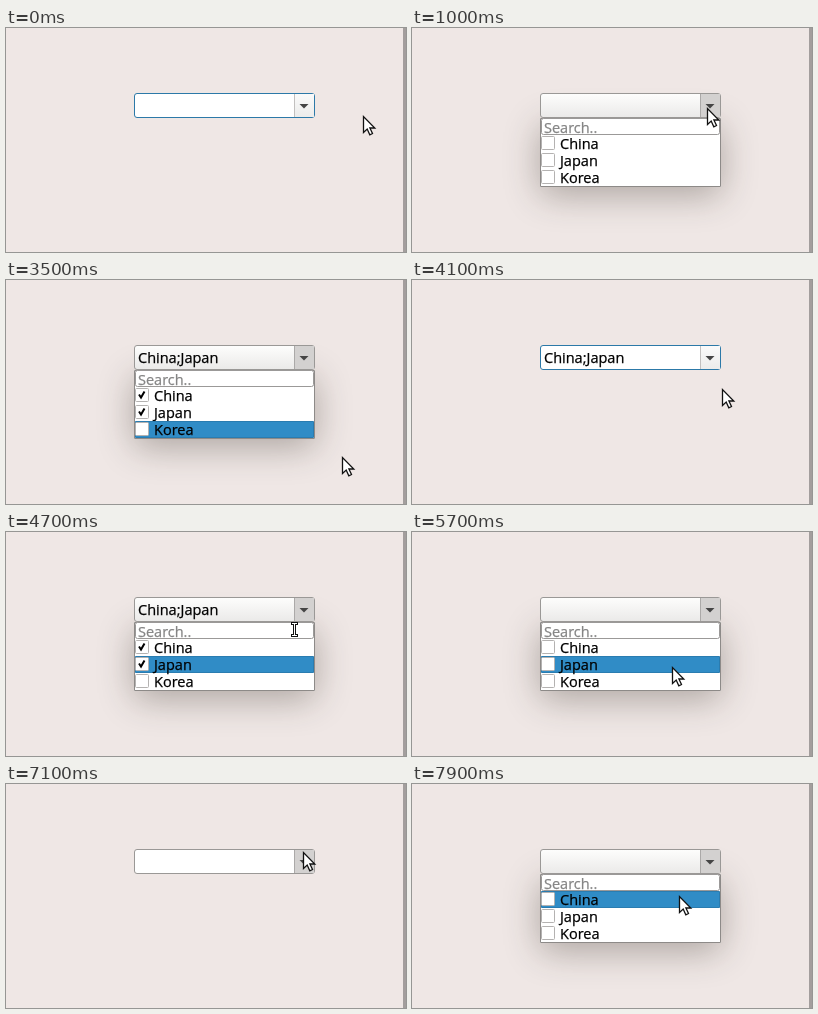
Write an HTML page with a canvas that moves like this. It is 400 by 224 pixels and loops after 8 s.

```html
<!DOCTYPE html>
<html lang="en">
<head>
<meta charset="utf-8">
<title>Checkable combo box</title>
<style>
  html, body { margin: 0; width: 100%; height: 100%; overflow: hidden; background: #efe7e5; }
  canvas { display: block; width: 400px; height: 224px; }
</style>
</head>
<body>
<canvas id="stage" width="400" height="224"></canvas>
<script>
const ctx = document.getElementById('stage').getContext('2d');
const LOOP = 8000, STEP = 100;
const FONT = '14.5px "Open Sans", "Noto Sans", sans-serif';
const ITEMS = ['China', 'Japan', 'Korea'];
const BOX = { x: 128, w: 181, top: 65, list: 90 };
const ROW_TOP = 107, ROW_H = 17;

// time, pointer tip and what it does there; a number toggles that item
const STOPS = [
  [0, 357, 88],
  [800, 298, 75, 'press'],
  [1800, 265, 119, 0],
  [2100, 265, 120],
  [2600, 262, 135, 1],
  [3600, 338, 178, 'close'],
  [4400, 297, 77, 'press'],
  [4700, 288, 97],
  [5000, 264, 114, 0],
  [5400, 260, 135, 1],
  [5700, 260, 135],
  [6200, 348, 90, 'close'],
  [7100, 297, 68, 'press'],
  [7900, 267, 112]
];

function pointerAt(t) {
  const next = STOPS.findIndex(stop => stop[0] > t);
  const b = STOPS.at(next), a = next > 0 ? STOPS[next - 1] : b;
  const p = a === b ? 1 : (t - a[0]) / (b[0] - a[0]);
  const e = p * p * (3 - 2 * p);
  const mix = i => Math.round(a[i] + (b[i] - a[i]) * e);
  return { x: mix(1), y: mix(2) };
}

function stateAt(t) {
  const s = { mode: 'close', checked: [false, false, false], hover: -1, current: -1 };
  for (let k = 0; k <= t; k += STEP) {
    s.pointer = pointerAt(k);
    s.opening = s.mode === 'press';
    if (s.opening) {
      s.mode = 'open';
      s.hover = s.current;
    }
    const action = STOPS.find(stop => stop[0] === k)?.[3];
    if (typeof action === 'number') {
      s.checked[action] = !s.checked[action];
      s.current = action;
    } else if (action) {
      s.mode = action;
    }
    const { x, y } = s.pointer;
    const row = Math.floor((y - ROW_TOP) / ROW_H);
    s.inside = s.mode === 'open' && x > BOX.x && x < BOX.x + BOX.w;
    if (s.inside && row >= 0 && row < ITEMS.length) s.hover = row;
  }
  return s;
}

function rect(x, y, w, h, fill) {
  ctx.fillStyle = fill;
  ctx.fillRect(x, y, w, h);
}

function frame(x, y, w, h, fill, line, r = 0) {
  ctx.beginPath();
  ctx.roundRect(x + 0.5, y + 0.5, w - 1, h - 1, r);
  ctx.fillStyle = fill;
  ctx.fill();
  ctx.strokeStyle = line;
  ctx.lineWidth = 1;
  ctx.stroke();
}

function label(str, x, y, color = '#000') {
  ctx.fillStyle = ctx.strokeStyle = color;
  ctx.lineWidth = 0.25;
  ctx.fillText(str, x, y);
  ctx.strokeText(str, x, y);
}

function trace(points) {
  ctx.beginPath();
  points.forEach(([x, y]) => ctx.lineTo(x, y));
}

function gradient(y0, y1, top, bottom) {
  const g = ctx.createLinearGradient(0, y0, 0, y1);
  g.addColorStop(0, top);
  g.addColorStop(1, bottom);
  return g;
}

function drawShadow(strength) {
  ctx.save();
  ctx.shadowColor = `rgba(50, 42, 34, ${0.36 * strength})`;
  ctx.shadowBlur = 36;
  ctx.shadowOffsetY = 8;
  rect(BOX.x, BOX.list, BOX.w, 69, '#fff');
  ctx.restore();
}

function drawCombo(s) {
  const idle = s.mode === 'close';
  const body = s.mode === 'open' ? gradient(66, 90, '#fdfdfc', '#eae9e8') : '#fff';
  frame(BOX.x, BOX.top, BOX.w, 25, body, idle ? '#2c79a8' : '#9a9896', 2.5);
  rect(289, 66, 19, 23, idle ? gradient(66, 89, '#fafafa', '#ececeb') : '#d3d1d0');
  rect(288, 66, 1, 23, idle ? '#c2c0bf' : '#aba9a8');
  trace([[293.5, 76], [302.5, 76], [298, 80.5]]);
  ctx.fillStyle = '#454545';
  ctx.fill();
  label(ITEMS.filter((_, i) => s.checked[i]).join(';'), 132, 83);
}

function drawTick(x, y) {
  trace([[x + 4, y + 6.5], [x + 6, y + 9.5], [x + 9.5, y + 3.5]]);
  ctx.strokeStyle = '#000';
  ctx.lineWidth = 2;
  ctx.stroke();
}

function drawPopup(s) {
  frame(BOX.x, BOX.list, BOX.w, 69, '#fff', '#8d8a88');
  frame(129, 90, 179, 17, '#fff', '#9b9998', 2);
  label('Search..', 132, 105, '#858585');
  ITEMS.forEach((name, i) => {
    const y = ROW_TOP + i * ROW_H;
    if (i === s.hover) frame(129, y, 179, ROW_H, '#308cc6', '#2a7cb0');
    frame(129, y + 1, 14, 14, '#fff', '#b4b2b1', 1);
    if (s.checked[i]) drawTick(129, y + 1);
    label(name, 148, y + 14);
  });
}

function drawArrow(x, y) {
  ctx.save();
  ctx.translate(x + 0.5, y + 0.5);
  trace([[0, 0], [0, 16], [3.7, 12.6], [6.3, 18.3], [9, 17], [6.4, 11.5], [11.3, 11.5]]);
  ctx.closePath();
  ctx.fillStyle = '#fff';
  ctx.fill();
  ctx.strokeStyle = '#111';
  ctx.lineWidth = 1.3;
  ctx.stroke();
  ctx.restore();
}

function drawBeam(x, y) {
  const bars = (pad, color) => {
    rect(x - 2 - pad, y - 6 - pad, 5 + 2 * pad, 1 + 2 * pad, color);
    rect(x - 2 - pad, y + 6 - pad, 5 + 2 * pad, 1 + 2 * pad, color);
    rect(x - pad, y - 6, 1 + 2 * pad, 13, color);
  };
  bars(1, '#111');
  bars(0, '#fff');
}

function draw(t) {
  const s = stateAt(t);
  const open = s.mode === 'open';
  const { x, y } = s.pointer;
  ctx.font = FONT;
  rect(0, 0, 400, 224, '#efe7e5');
  if (open) drawShadow(s.opening ? 0.6 : 1);
  rect(397, 0, 3, 224, '#a39e9d');
  drawCombo(s);
  if (open) drawPopup(s);
  if (s.inside && y > BOX.list && y < ROW_TOP) drawBeam(x, y);
  else drawArrow(x, y);
}

const start = performance.now();
function tick() {
  const t = (performance.now() - start) % LOOP;
  draw(Math.floor(t / STEP) * STEP);
  requestAnimationFrame(tick);
}
tick();
</script>
</body>
</html>
```
